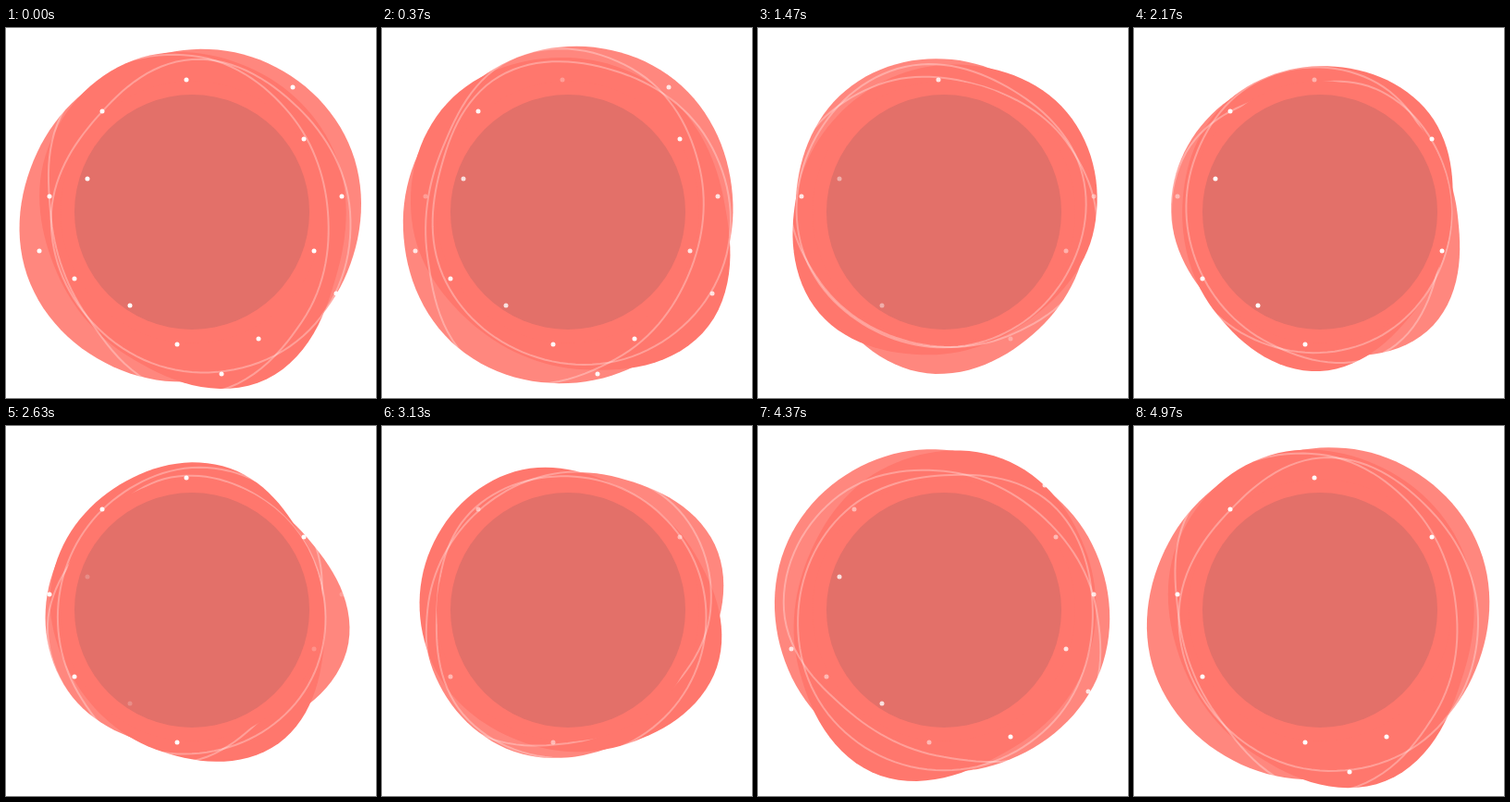
Recreate the animation shown at these times as an HTML page. Size 400 px wide and 400 px high, loop 5 s.

```html
<!DOCTYPE html>
<html lang="en">
<head>
<meta charset="utf-8">
<title>Rotating blobs</title>
<style>
  html, body { margin: 0; width: 100%; height: 100%; overflow: hidden; background: #fff; }
  svg { display: block; width: 100%; height: 100%; }
  .line { fill: none; stroke: #fff; stroke-width: 2; stroke-opacity: .3; }
</style>
</head>
<body>
<svg id="stage" viewBox="0 0 400 400"></svg>
<script>
const LOOP = 5000;
const CENTER = { x: 201, y: 199 };
const CORAL = "#ff776d";

// A blob turns once per loop while it eases from its wide shape to its tight one and back.
// A shape is eight evenly spaced radii, clockwise from the offset angle.
const blobs = [
  {
    spin: -1, offset: 22.5, style: { fill: CORAL, "fill-opacity": .88 },
    wide: [180, 180, 187, 191, 179, 173, 180, 185],
    tight: [156, 145, 140, 147, 173, 152, 150, 160]
  },
  {
    spin: -1, offset: 22.5, style: { fill: CORAL },
    wide: [170, 198, 171, 160, 170, 176, 168, 167],
    tight: [155, 156, 159, 142, 147, 172, 156, 148]
  },
  {
    spin: 1, offset: 0, style: { class: "line" },
    wide: [147, 168, 197, 160, 153, 179, 169, 150],
    tight: [144, 146, 155, 153, 136, 138, 167, 152]
  },
  {
    spin: -1, offset: 0, style: { class: "line" },
    wide: [171, 180, 173, 160, 152, 145, 165, 161],
    tight: [158, 135, 145, 142, 143, 150, 154, 160]
  }
];

// Dots that share a twinkling rate, in beats per loop.
const twinkles = [
  { beats: 1, dots: [[273, 336]] },
  { beats: 2, dots: [[104, 90], [36, 111], [322, 120], [74, 271], [185, 342], [233, 374]] },
  { beats: 2.5, dots: [[310, 64], [88, 163], [363, 182], [36, 241], [333, 241], [357, 287], [134, 300]] },
  { beats: 4, dots: [[195, 56], [47, 182]] }
];

const stage = document.getElementById("stage");

function add(tag, attributes, parent = stage) {
  const node = document.createElementNS("http://www.w3.org/2000/svg", tag);
  for (const [key, value] of Object.entries(attributes)) node.setAttribute(key, value);
  return parent.appendChild(node);
}

const addCircle = (cx, cy, r, fill, parent) => add("circle", { cx, cy, r, fill }, parent);
const mix = (a, b, amount) => a + (b - a) * amount;
const wave = turns => Math.cos(2 * Math.PI * turns);

// Catmull-Rom curve through a closed ring of radii.
function radiusAt(ring, degrees) {
  const count = ring.length;
  const place = degrees / 360 * count;
  const base = Math.floor(place);
  const f = place - base;
  const [a, b, c, d] = [-1, 0, 1, 2].map(step => ring[((base + step) % count + count) % count]);
  return b + f / 2 * (c - a + f * (2 * a - 5 * b + 4 * c - d + f * (3 * (b - c) + d - a)));
}

function outline({ wide, tight, spin, offset }, progress) {
  const squeeze = (1 - wave(progress)) / 2;
  const ring = wide.map((radius, i) => mix(radius, tight[i], squeeze));
  const shift = offset + spin * 360 * progress;
  const points = [];
  for (let angle = 0; angle < 360; angle += 3) {
    const radius = radiusAt(ring, angle - shift);
    const radians = angle * Math.PI / 180;
    const x = CENTER.x + radius * Math.cos(radians);
    const y = CENTER.y + radius * Math.sin(radians);
    points.push(`${x.toFixed(2)} ${y.toFixed(2)}`);
  }
  return `M${points.join("L")}Z`;
}

for (const blob of blobs) blob.node = add("path", blob.style);
addCircle(CENTER.x, CENTER.y, 142, CORAL);
addCircle(CENTER.x, CENTER.y, 127, "#e37069");
for (const twinkle of twinkles) {
  twinkle.node = add("g", {});
  for (const [x, y] of twinkle.dots) addCircle(x, y, 2.5, "#fff", twinkle.node);
}

function draw(progress) {
  for (const blob of blobs) blob.node.setAttribute("d", outline(blob, progress));
  for (const { node, beats } of twinkles) {
    const glow = .5 + .75 * wave(beats * progress);
    node.setAttribute("opacity", Math.min(1, Math.max(0, glow)).toFixed(3));
  }
}

const start = performance.now();
function tick() {
  draw((performance.now() - start) % LOOP / LOOP);
  requestAnimationFrame(tick);
}
tick();
</script>
</body>
</html>
```
